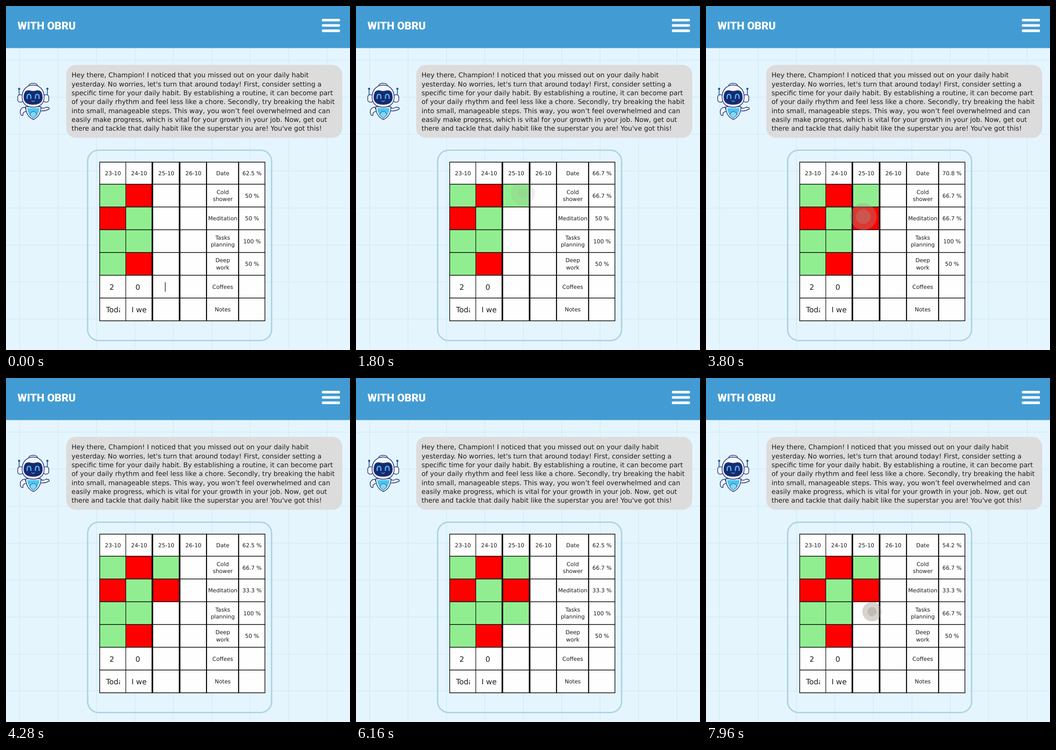
Recreate the animation shown at these times as an HTML page. Size 748 by 748 pixels, loop 8 s.

```html
<!DOCTYPE html>
<html lang="en">
<head>
<meta charset="utf-8">
<title>Habit tracker</title>
<style>
  html, body { margin: 0; width: 100%; height: 100%; overflow: hidden; background: #e5f5fe; }
  svg { display: block; width: 100vw; height: 100vh; }
  text { font-family: "DejaVu Sans", sans-serif; fill: #1c1c1c; text-rendering: geometricPrecision; }
  .brand { font: 900 23.5px Roboto, sans-serif; fill: #fff; }
  .message { font-size: 14.45px; }
  .cell { font-size: 12px; text-anchor: middle; }
  .entry { font-size: 16px; }
  .touch { fill: rgb(160, 154, 142); }
  #caret { animation: blink 1s step-end infinite; }
  @keyframes blink { 50% { opacity: 0; } }
</style>
</head>
<body>
<svg viewBox="0 0 748 748">
  <defs>
    <pattern id="paper" x="29" y="117" width="83.5" height="80.4" patternUnits="userSpaceOnUse">
      <path d="M.8 0V81M0 .8H84" stroke="#d0edf5" stroke-width="1.5"/>
    </pattern>
    <clipPath id="inputs"><path d="M216 640h32v40h-32zM272 640h33v40h-33z"/></clipPath>
  </defs>
  <rect width="748" height="748" fill="#e5f5fe"/>
  <rect width="748" height="748" fill="url(#paper)"/>

  <rect width="748" height="91.5" fill="#429cd3"/>
  <text class="brand" x="25" y="51">WITH OBRU</text>
  <path d="M689.5 30.7H723.5M689.5 42.3H723.5M689.5 53.9H723.5" stroke="#fff" stroke-width="5.6" stroke-linecap="round"/>

  <g id="robot" fill="#f4f8fd" stroke="#26397c" stroke-width="1.5" stroke-linejoin="round" stroke-linecap="round">
    <path d="M28.5 180V198M90 180V198" stroke="#3f78b8" stroke-width="2.2"/>
    <circle cx="28.5" cy="180" r="1.6" fill="#3d9be0"/>
    <circle cx="90" cy="180" r="1.6" fill="#3d9be0"/>
    <path d="M49 174q1-6 10-6t10 6z" fill="#dce6f2"/>
    <rect x="25.500" y="193" width="12" height="16" rx="5"/>
    <rect x="81" y="193" width="12" height="16" rx="5"/>
    <path d="M41 220q-10 1-10 10t6 8q-2-8 8-9z"/>
    <path d="M76 221q6 3 11-1q8 0 7 4q-8 5-19 4z"/>
    <path d="M43 219H76Q76 239 59.500 247Q43 239 43 219z"/>
    <path d="M46 222H73Q72 237 59.500 244Q47 237 46 222z" fill="#4cc5ee" stroke="none"/>
    <path d="M52 237a7.500 7.500 0 0 1 15 0l-7.500 7z" fill="#7bdcf7" stroke-width="1"/>
    <path d="M35 198C35 181 46 172 59 172S83 181 83 198C83 213 73 220 59 220S35 213 35 198z"/>
    <path d="M39 200Q39 183 50 184Q59 187 68 184Q79 183 79 200Q78 214 59 214T39 200z" fill="#182a70"/>
    <path d="M46 201v-3q0-6 4-6t4 6v3M64 201v-3q0-6 4-6t4 6v3" fill="none" stroke="#4cb9f2" stroke-width="2.6"/>
    <path d="M56 206q3 3 6 0" fill="none" stroke="#4cb9f2"/>
  </g>

  <rect x="131" y="128" width="600" height="158.500" rx="21" fill="#dcdcdc"/>
  <g id="message"></g>

  <rect x="177.500" y="313.500" width="400" height="414" rx="24" fill="none" stroke="#add6e1" stroke-width="3.2"/>
  <rect x="203.500" y="339" width="359.500" height="345.500" fill="#fffefe"/>
  <g id="marks"></g>
  <g id="rules" fill="none" stroke="#000"></g>
  <g id="labels"></g>
  <text class="entry" x="225" y="617">2</text>
  <text class="entry" x="281.500" y="617">0</text>
  <g clip-path="url(#inputs)">
    <text class="entry" x="217.500" y="665.500">Today</text>
    <text class="entry" x="273" y="665.500">I went</text>
  </g>
  <g id="focus"><path id="caret" d="M346.300 600.500V621" stroke="#111" stroke-width="1.3"/></g>
  <circle id="outer" class="touch"/>
  <circle id="inner" class="touch"/>
</svg>
<script>
const $ = id => document.getElementById(id);
const LOOP = 8000, SAVE_DELAY = 320;
const GREEN = '#90ee90', RED = '#ff0000';
const rows = [339.5, 387.5, 437, 486.5, 536, 585.5, 635, 684.5];

function add(parent, tag, attrs, content = '') {
  const node = document.createElementNS('http://www.w3.org/2000/svg', tag);
  for (const key in attrs) node.setAttribute(key, attrs[key]);
  node.textContent = content;
  return $(parent).appendChild(node);
}
const label = (x, y, content) => add('labels', 'text', { class: 'cell', x, y }, content);

[
  'Hey there, Champion! I noticed that you missed out on your daily habit',
  "yesterday. No worries, let's turn that around today! First, consider setting a",
  'specific time for your daily habit. By establishing a routine, it can become part',
  'of your daily rhythm and feel less like a chore. Secondly, try breaking the habit',
  'into small, manageable steps. This way, you won’t feel overwhelmed and can',
  'easily make progress, which is vital for your growth in your job. Now, get out',
  "there and tackle that daily habit like the superstar you are! You've got this!"
].forEach((line, i) => add('message', 'text', { class: 'message', x: 142.5, y: 155.3 + i * 19.3 }, line));

const mark = (x, width, row, fill) =>
  add('marks', 'rect', { x, y: rows[row + 1], width, height: rows[row + 2] - rows[row + 1], fill });

// Earlier days: one letter per habit, g = done, r = missed.
const days = ['grgg', 'rggr'];
days.forEach((day, d) => [...day].forEach((m, row) =>
  mark(d ? 260.5 : 203.5, 57, row, m === 'g' ? GREEN : RED)));
const today = [0, 1, 2, 3].map(row => mark(318.5, 58.5, row, 'none'));

rows.forEach(y => add('rules', 'path', { d: `M203 ${y}H563.5`, 'stroke-width': 1.3 }));
[[203.7, 1.4], [260.5, 1.2], [318.3, 3.4], [377.5, 3.4], [436, 2.2], [505.8, 2.2], [563, 1.4]]
  .forEach(([x, width]) => add('rules', 'path', { d: `M${x} 339V685`, 'stroke-width': width }));

[232.5, 289.5, 348.5, 407.5].forEach((x, i) => label(x, 367.5, `${23 + i}-10`));
['Date', 'Cold shower', 'Meditation', 'Tasks planning', 'Deep work', 'Coffees', 'Notes'].forEach((name, i) => {
  const words = name.split(' ');
  const middle = (rows[i] + rows[i + 1]) / 2 + 4.3;
  words.forEach((word, k) => label(471.3, middle + (k - (words.length - 1) / 2) * 15.3, word));
});
const scores = [0, 1, 2, 3, 4].map(i => label(535, (rows[i] + rows[i + 1]) / 2 + 4.5, ''));

const taps = [
  { at: 1380, row: 0, state: 'g', x: 363, y: 408 },
  { at: 2760, row: 1, state: 'g', x: 342, y: 458 },
  { at: 3640, row: 1, state: 'r', x: 342, y: 458 },
  { at: 4950, row: 2, state: 'g', x: 361, y: 508 },
  { at: 6800, row: 2, state: 'r', x: 361, y: 508 },
  { at: 7880, row: 2, state: '', x: 361, y: 508 }
];

// age, inner radius, inner opacity, outer radius, outer opacity
const ripple = [
  [0, 14, .45, 14, 0],
  [80, 10, .42, 21, .42],
  [160, 16, .32, 29, .35],
  [240, 18, .4, 34, .16],
  [420, 11, .1, 26, .15],
  [490, 10, 0, 25, 0]
];

function ripplePose(age) {
  const i = ripple.findIndex(key => key[0] > age);
  if (i < 1) return [0, 0, 0, 0, 0];
  const from = ripple[i - 1], to = ripple[i];
  const k = (age - from[0]) / (to[0] - from[0]);
  return from.map((v, j) => v + (to[j] - v) * k);
}

function marksAt(t) {
  const marks = ['', '', '', ''];
  for (const tap of taps) if (tap.at <= t) marks[tap.row] = tap.state;
  return marks;
}

function setCircle(id, x, y, r, opacity) {
  const node = $(id);
  Object.entries({ cx: x, cy: y, r, opacity }).forEach(([key, v]) => node.setAttribute(key, v));
}

function render(t) {
  marksAt(t).forEach((m, row) =>
    today[row].setAttribute('fill', m === 'g' ? GREEN : m === 'r' ? RED : 'none'));

  const percents = marksAt(t - SAVE_DELAY).map((m, row) => {
    const history = days[0][row] + days[1][row] + m;
    return 100 * history.split('g').slice(1).length / history.length;
  });
  const mean = percents.reduce((a, b) => a + b) / percents.length;
  [mean, ...percents].forEach((p, i) => { scores[i].textContent = `${+p.toFixed(1)} %`; });

  $('focus').setAttribute('visibility', t < taps[0].at ? 'visible' : 'hidden');

  const tap = taps.filter(p => p.at <= t).pop() || taps[0];
  const [, innerR, innerA, outerR, outerA] = ripplePose(t - tap.at);
  setCircle('outer', tap.x, tap.y, outerR, outerA);
  setCircle('inner', tap.x, tap.y, innerR, innerA);
}

const start = performance.now();
function tick() {
  render((performance.now() - start) % LOOP);
  requestAnimationFrame(tick);
}
tick();
</script>
</body>
</html>
```
